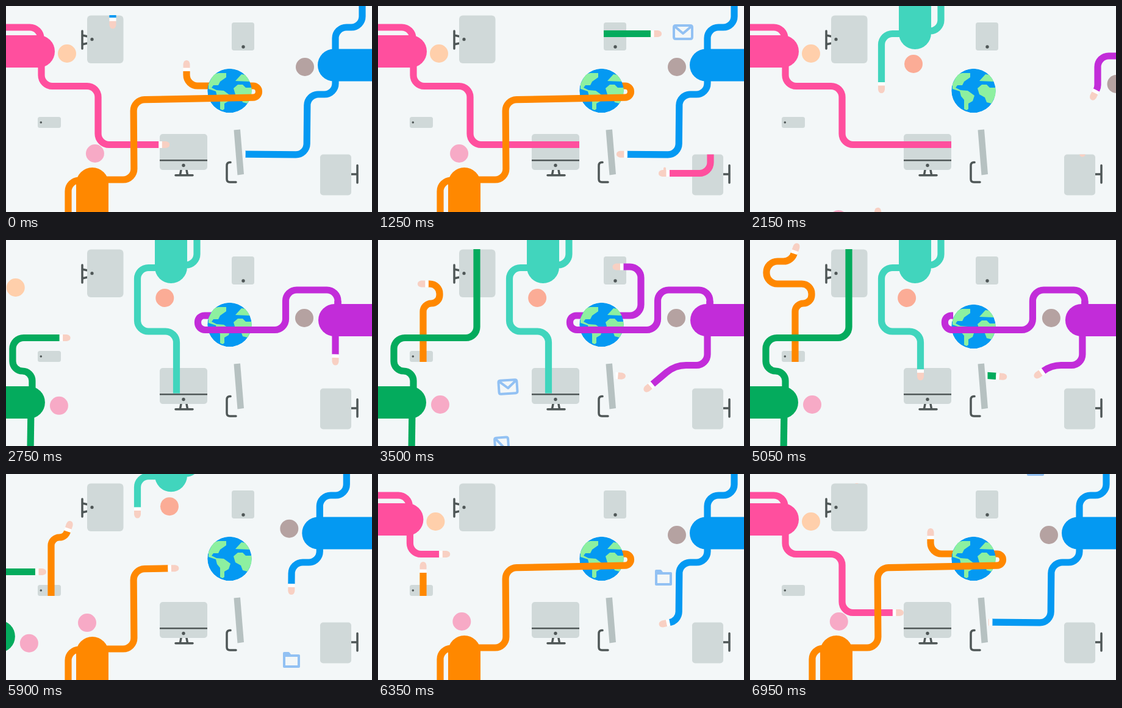
Animation, 600 px wide and 338 px high, one loop 7000 ms. Source, as an HTML page:

```html
<!DOCTYPE html>
<html lang="en">
<head>
<meta charset="utf-8">
<title>Reaching through screens</title>
<style>
  html, body { margin: 0; width: 100%; height: 100%; overflow: hidden; background: #f3f7f8; }
  svg { display: block; width: 100%; height: 100%; }
  .device { fill: #d0d9d9; }
  .dark { fill: #4f5757; }
  .line { fill: none; stroke: #4f5757; stroke-width: 3.5; stroke-linecap: round; }
  .limb { fill: none; stroke-width: 11.2; }
  .body { fill: none; stroke-width: 53; stroke-linecap: round; }
  .icon { fill: #f3f7f8; stroke: #92c1f3; stroke-width: 4; stroke-linejoin: round; }
</style>
</head>
<body>
<svg viewBox="0 0 600 338" preserveAspectRatio="none">
  <defs>
    <clipPath id="disc"><circle cx="366.5" cy="139" r="36.3"/></clipPath>
  </defs>
  <rect width="600" height="338" fill="#f3f7f8"/>
  <g>
    <path class="line" d="M125 41V70M125 48L134 50M125 63L134 61"/>
    <rect class="device" x="133" y="15.5" width="59.5" height="78.500" rx="6"/>
    <circle class="dark" cx="141" cy="54.7" r="2.6"/>
    <rect class="device" x="370" y="27" width="37" height="46" rx="4"/>
    <circle class="dark" cx="389" cy="67" r="2.7"/>
    <rect class="device" x="52" y="182" width="38" height="18" rx="3.5"/>
    <circle class="dark" cx="57.3" cy="191" r="1.8"/>
    <path class="line" d="M287 269L285.500 277M296 269L297.500 277M278 277.700H306"/>
    <rect class="device" x="252" y="210" width="78" height="59" rx="5"/>
    <path class="line" style="stroke-width:2.5;stroke-linecap:butt" d="M252 253.300H330"/>
    <circle class="dark" cx="291" cy="261.5" r="2.7"/>
    <path class="line" d="M368 256.500Q362 256 362 262V284Q362 289 367 289H377"/>
    <path fill="#b6c1c1" d="M373.500 203.500L384 202.500L390 276L379.500 277.500Z"/>
    <path class="line" d="M566 276H576M576 261.500V290"/>
    <rect class="device" x="515" y="243.5" width="51" height="67" rx="5"/>
  </g>
  <g id="back"></g>
  <g id="globe" clip-path="url(#disc)">
    <circle cx="366.5" cy="139" r="36.3" fill="#0499f2"/>
    <path fill="#8df0a0" d="M332 128L340 112L348 110L361 110V117L351 124L348 130H340L337 134L345 138L357 139L368 147L365 156L358 160V169L355 171L351 169V154L346 148L344 140L332 136Z
      M376 123L386 112L393 113L400 124ZM373 135L380 129H388L393 134H404V144L396 160L388 158L385 150L376 145Z"/>
  </g>
  <g id="front"></g>
</svg>
<script>
const LOOP = 7000, STEP = 50, CORNER = 18;
const PINK = '#ff4f9e', ORANGE = '#ff8800', BLUE = '#0499f2';
const GREEN = '#04ab5d', TEAL = '#41d5bd', PURPLE = '#c22cd9';
const ROSE = '#f7aac6', BROWN = '#b5a2a1', HAND = '#f8d0c3';
const back = document.getElementById('back');
const front = document.getElementById('front');
const defs = document.querySelector('defs');
const updates = [];

function add(parent, tag, attrs = {}) {
  const el = document.createElementNS('http://www.w3.org/2000/svg', tag);
  for (const name in attrs) el.setAttribute(name, attrs[name]);
  return parent.appendChild(el);
}

// Easing
const progress = (t, from, to) => Math.min(1, Math.max(0, (t - from) / (to - from)));
const smooth = s => s * s * (3 - 2 * s);
const overshoot = s => 1 + 3.4 * (s - 1) ** 3 + 2.4 * (s - 1) ** 2;

// 0 before the first time, 1 between the middle two, 0 after the last.
const visit = (t, [start, full, leave, gone], arrive = smooth) =>
  arrive(progress(t, start, full)) - smooth(progress(t, leave, gone));

// Turns "x,y x,y ..." into a line with circular corners.
function route(text) {
  const pts = text.split(' ').map(p => p.split(',').map(Number));
  const segs = pts.slice(1).map(([x, y], i) => {
    const dx = x - pts[i][0], dy = y - pts[i][1], len = Math.hypot(dx, dy);
    const atEnd = i === 0 || i === pts.length - 2;
    return { ux: dx / len, uy: dy / len, room: atEnd ? len : len / 2 };
  });
  let d = 'M' + pts[0];
  for (let i = 1; i < segs.length; i++) {
    const a = segs[i - 1], b = segs[i], [x, y] = pts[i];
    const cut = Math.min(CORNER, a.room, b.room);
    const turn = Math.acos(a.ux * b.ux + a.uy * b.uy);
    const radius = cut / Math.tan(turn / 2);
    const sweep = a.ux * b.uy > a.uy * b.ux ? 1 : 0;
    d += `L${x - a.ux * cut} ${y - a.uy * cut}`;
    d += `A${radius} ${radius} 0 0 ${sweep} ${x + b.ux * cut} ${y + b.uy * cut}`;
  }
  return d + 'L' + pts[pts.length - 1];
}

function clipTo([x, y, width, height]) {
  const id = 'clip' + defs.children.length;
  add(add(defs, 'clipPath', { id }), 'rect', { x, y, width, height });
  return `url(#${id})`;
}

function makeHand(parent, thumb) {
  const g = add(parent, 'g');
  add(g, 'rect', { x: 0, y: -5.5, width: 6, height: 11, fill: '#fff' });
  add(g, 'path', { fill: HAND, d: 'M5.500 -5.500H12Q18 -4.500 18 0T12 5.500H5.500Z' });
  if (thumb) add(g, 'rect', { x: 6, y: 0, width: 4, height: 10, rx: 2, fill: HAND });
  return g;
}

const sameTime = t => t;
const acrossLoop = t => t < LOOP / 2 ? t + LOOP : t;
const noShift = () => [0, 0];

// An arm grows along its route; the part "behind" runs behind the globe.
function makeArm({ color, path, behind, clip, span, thumb, clock = sameTime, shift = noShift }) {
  const pieces = [[path, front], [behind, back]].filter(([text]) => text).map(([text, layer]) => {
    const outer = add(layer, 'g', clip ? { 'clip-path': clipTo(clip) } : {});
    const g = add(outer, 'g');
    const line = add(g, 'path', { class: 'limb', d: route(text), stroke: color });
    return { g, line, hand: makeHand(g, thumb), total: line.getTotalLength() };
  });
  const reach = pieces.reduce((sum, piece) => sum + piece.total, 0);
  updates.push(now => {
    const t = clock(now);
    let left = reach * visit(t, span);
    pieces.forEach(({ g, line, hand, total }, i) => {
      const len = Math.max(0, Math.min(left, total));
      const holdsTip = left > 0 && (left <= total || i === pieces.length - 1);
      const a = line.getPointAtLength(Math.max(0, len - 1));
      const b = line.getPointAtLength(Math.max(1, len));
      const angle = Math.atan2(b.y - a.y, b.x - a.x) * 180 / Math.PI;
      g.setAttribute('transform', `translate(${shift(t)})`);
      line.setAttribute('stroke-dasharray', `${len} 9999`);
      hand.setAttribute('visibility', holdsTip ? 'visible' : 'hidden');
      hand.setAttribute('transform', `translate(${b.x} ${b.y}) rotate(${angle})`);
      left -= total;
    });
  });
}

// A person slides in from "away", stretches arms, and slides out again.
function makePerson({ color, skin, body, limb, head, sway, lean = 0, away, stay, arrive, arms, clock = sameTime }) {
  const shift = t => away.map(d => d * (1 - visit(t, stay, arrive)));
  arms.forEach(arm => makeArm({ color, clock, shift, ...arm }));
  const g = add(front, 'g');
  add(g, 'path', { class: 'limb', d: route(limb), stroke: color });
  add(g, 'path', { class: 'body', d: body, stroke: color });
  const face = add(g, 'circle', { r: 15, fill: skin });
  updates.push(now => {
    const t = clock(now), [dx, dy] = shift(t);
    const swing = sway ? sway.size * Math.cos(2 * Math.PI * (t - sway.peak) / sway.period) : 0;
    g.setAttribute('transform', `translate(${dx} ${dy})`);
    face.setAttribute('cx', head[0] + swing);
    face.setAttribute('cy', head[1] + lean * dx);
  });
}

function makeIcon(shape, place) {
  const icon = add(front, 'path', { class: 'icon', d: shape });
  updates.push(t => {
    const [x, y, angle = 0] = place(t);
    icon.setAttribute('transform', `translate(${x} ${y}) rotate(${angle})`);
  });
}

const MAIL = 'M-12 -11H12Q15 -11 15 -8V8Q15 11 12 11H-12Q-15 11 -15 8V-8Q-15 -11 -12 -11ZM-13 -9L0 2L13 -9';
const FOLDER = 'M-12 -11H-5L-2 -7H12V11H-12ZM-12 -7H-2';

makeIcon(MAIL, t => [t < 1150 ? -50 : 500 + (t - 1250) * 0.4, 43]);
for (const lane of [0, 1]) {
  makeIcon(MAIL, t => {
    const rise = (t - 3500) * 0.27 - lane * 98;
    return [213 - lane * 10, 241 - rise, rise * 0.92 - 4];
  });
}
makeIcon(FOLDER, t => [468, 305 - (t - 5900) * 0.3]);

// Hands that come out of a screen
makeArm({ color: BLUE, clock: acrossLoop, path: '175,-3 175,60', clip: [133, 15, 60, 100], span: [6940, 7090, 7600, 8100] });
makeArm({ color: GREEN, path: '350,45.5 447,45.5', clip: [370, 0, 230, 100], span: [700, 1200, 1300, 1950] });
makeArm({ color: PINK, thumb: true, path: '545,228 545,274.5 478,274.5', clip: [440, 243.5, 130, 80], span: [300, 900, 1500, 2200] });
makeArm({
  color: ORANGE, clip: [0, 0, 140, 200], span: [2900, 4100, 4600, 6880],
  path: '74,206 74,104 101,104 101,72 27,72 27,35 73,35 73,-10'
});
makeArm({ color: GREEN, path: '372,221 411,224', clip: [389.5, 200, 80, 60], span: [3250, 3820, 4900, 5425] });

makePerson({
  color: PINK, skin: '#ffcfab', clock: acrossLoop,
  body: 'M-80 74.500H53.500', limb: '-80,35 57,35 57,60', head: [100, 78],
  away: [-130, 0], stay: [6000, 6400, 9450, 9950],
  arms: [{
    path: '58,95 58,131.5 151,131.5 151,227.5 350,227.5',
    clip: [-100, -100, 430, 500], span: [5890, 7535, 9050, 9900]
  }]
});

makePerson({
  color: BLUE, skin: BROWN, clock: acrossLoop,
  body: 'M760 97H537.500', limb: '540,80 540,35 584,35 584,-20', head: [490, 100], lean: 0.4,
  away: [145, 0], stay: [5450, 6300, 8400, 8850], arrive: overshoot,
  arms: [{
    path: '540,120 540,145 494,145 493,244 370,243',
    clip: [391, 0, 500, 338], span: [4912, 7452, 8000, 9046]
  }]
});

makePerson({
  color: ORANGE, skin: ROSE, clock: acrossLoop,
  body: 'M141.500 480V291.500', limb: '125,286 102,286 102,480', head: [139.5, 242],
  sway: { size: 6.5, peak: 7050, period: 2300 },
  away: [0, 120], stay: [5300, 5950, 8400, 9333],
  arms: [{
    path: '160,285 210,285 209,154 414.5,150 414.5,131 405,131', behind: '405,131 296,131 296,107',
    span: [5031, 6950, 7790, 9627]
  }]
});

makePerson({
  color: GREEN, skin: ROSE,
  body: 'M-100 266.500H52.500', limb: '56,280 55,350', head: [102, 270], lean: -0.12,
  away: [-145, 0], stay: [2350, 2850, 5600, 6250],
  arms: [{
    path: '58,245 58,215 26,215 26,160.5 162,160.5 162,-20',
    clip: [-200, 15, 500, 330], span: [2300, 3300, 5200, 6510]
  }]
});

makePerson({
  color: TEAL, skin: '#fbac96',
  body: 'M270.500 -80V44.500', limb: '290,41 313,41 313,-80', head: [262.5, 95],
  sway: { size: 5.5, peak: 2150, period: 1900 },
  away: [0, -140], stay: [1650, 2050, 5650, 6340],
  arms: [{
    path: '250,45.5 215.5,45.5 215.5,150 279.5,150 279.5,280',
    clip: [150, -100, 200, 351.5], span: [1650, 2919, 4358, 6649]
  }]
});

makePerson({
  color: PURPLE, skin: BROWN,
  body: 'M850 131.500H538.500', limb: '544,112 544,100', head: [489, 128],
  away: [200, 0], stay: [1850, 2500, 4980, 5730],
  arms: [{
    path: '544,110 544,82 458.5,82 458.5,147.5 314.5,147.5 314.5,124 325,124',
    behind: '325,124 431,124 431,44 370,44', span: [1224, 3892, 4250, 6068]
  }, {
    path: '540,150 540,205.5 487,205.5 443,242.5', span: [2300, 3712, 4600, 5904]
  }]
});

// The globe dips a little when the arm around it pulls back.
const globe = document.getElementById('globe');
updates.push(t => globe.setAttribute('transform', `translate(0 ${3 * visit(t, [4500, 5050, 5050, 5500])})`));

const start = performance.now();
function draw(now) {
  const t = Math.floor(Math.max(0, now - start) % LOOP / STEP) * STEP;
  updates.forEach(update => update(t));
  requestAnimationFrame(draw);
}
draw(start);
</script>
</body>
</html>
```
